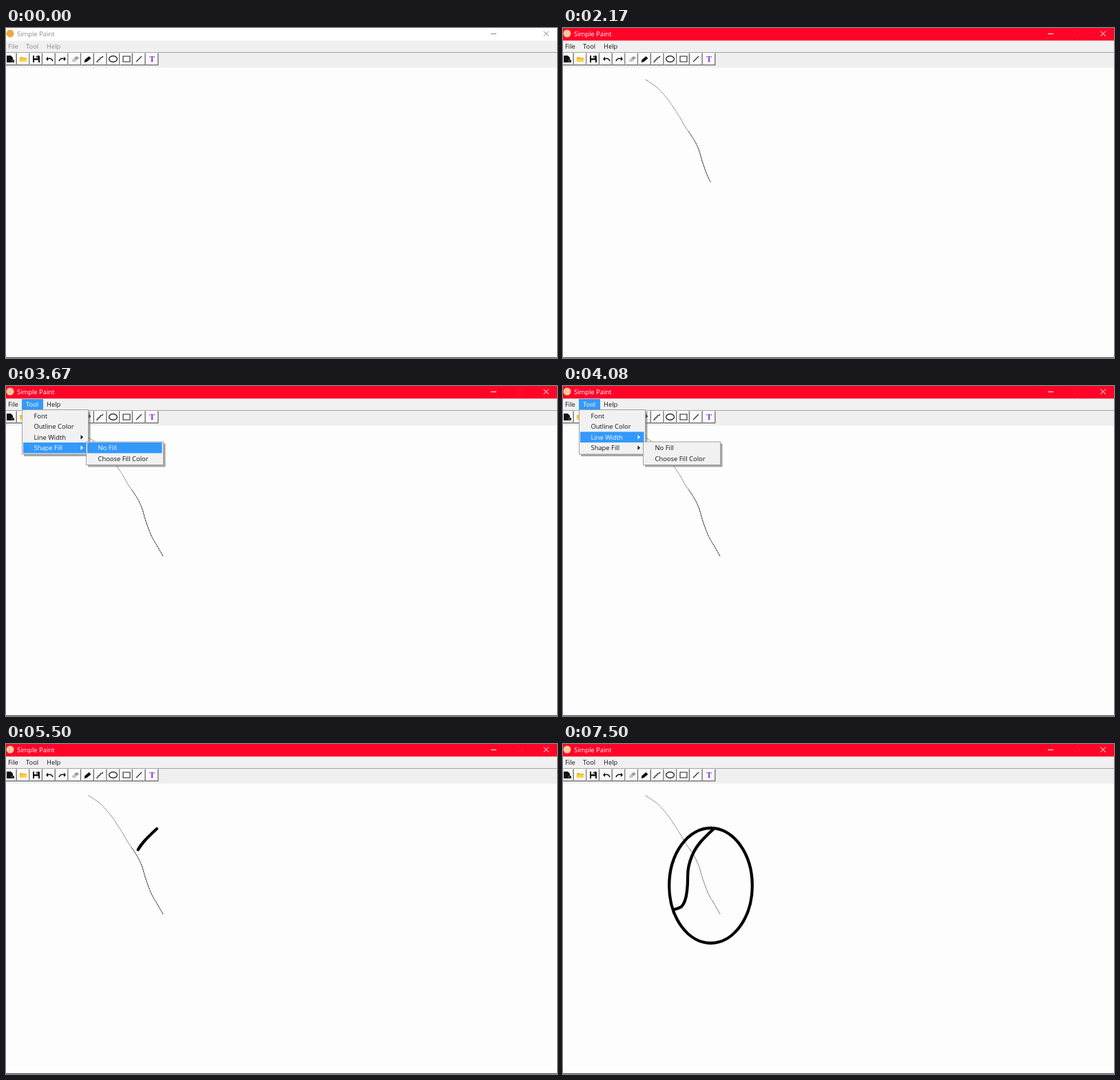
Recreate the animation shown at these times as an HTML page. Size 800 by 479 pixels, loop 8 s.

```html
<!DOCTYPE html>
<html lang="en">
<head>
<meta charset="utf-8">
<title>Simple Paint</title>
<style>
  html, body { margin: 0; width: 100%; height: 100%; overflow: hidden; background: #fefdfe; }
  svg { display: block; width: 100vw; height: 100vh; }
  text { font: 9.4px "Open Sans", "Noto Sans", sans-serif; }
  .ink { fill: none; stroke: #000; stroke-linecap: round; stroke-linejoin: round; }
</style>
</head>
<body>
<svg id="stage" viewBox="0 0 800 479" preserveAspectRatio="none"></svg>
<script>
const LOOP = 8000, TICK = 1000 / 12;
const BLUE = '#3399fc';
const stage = document.getElementById('stage');

const rect = (x, y, w, h, fill, extra = '') =>
  `<rect x="${x}" y="${y}" width="${w}" height="${h}" fill="${fill}" ${extra}/>`;
const path = (d, stroke, width = 1, extra = '') =>
  `<path d="${d}" fill="none" stroke="${stroke}" stroke-width="${width}" ${extra}/>`;
const label = (x, y, s, fill = '#111') => `<text x="${x}" y="${y}" fill="${fill}">${s}</text>`;

// Linear interpolation through [tick, value] pairs.
function at(k, table) {
  if (k <= table[0][0]) return table[0][1];
  for (let i = 1; i < table.length; i++) {
    const [a, u] = table[i - 1], [b, v] = table[i];
    if (k <= b) return u + (v - u) * (k - a) / (b - a);
  }
  return table[table.length - 1][1];
}

// Smooth curve through points, using midpoints as joints.
function curve(points) {
  let d = `M${points[0]}`;
  for (let i = 1; i < points.length - 1; i++) {
    const [x, y] = points[i], [u, v] = points[i + 1];
    const last = i === points.length - 2;
    d += `Q${x} ${y} ${last ? u : (x + u) / 2} ${last ? v : (y + v) / 2}`;
  }
  return d;
}

const THIN = curve([[120, 75], [128, 80], [138, 87], [146, 96], [155, 107], [162, 118], [170, 130],
  [177, 143], [185, 154], [192, 165], [198, 178], [201, 190], [206, 205], [212, 220], [219, 231], [228, 247]]);
const THICK = curve([[219, 123], [205, 136], [194, 149], [187, 162], [182, 178], [181, 190],
  [181, 205], [179, 222], [175, 233], [170, 238], [162, 240]]);

const THIN_REACH = [[15, 75], [25, 211], [28, 249]];
const THICK_REACH = [[62, 0], [66, 0.295], [72, 0.81], [76, 1]];
const OVAL_REACH = [[85, 0.04], [86, 0.25], [88, 0.75], [89, 0.92], [90, 1]];

// Icons are centred on 0,0.
const ICONS = [
  '<path d="M-5-5H1L4-2V5H-5Z"/><path d="M1 1H6V5H1Z" fill="#333"/>',
  '<path d="M-5-3H-1L0-2H5V4H-5Z" fill="#f3bd2a"/><path d="M-5 4L-3 0H5V4Z" fill="#ffd24d"/>',
  '<path d="M-5-5H4L5-4V5H-5Z"/><path d="M-3-5H2V-1H-3ZM-3 1.5H3V5H-3Z" fill="#fff"/><path d="M0-4.5H1.5V-2H0Z"/>',
  '<path d="M-5 0L-2-3.5V3Z"/><path d="M-3 0Q3-2.5 5 3" fill="none" stroke="#111" stroke-width="1.6"/>',
  '<path d="M5 0L2-3.5V3Z"/><path d="M3 0Q-3-2.5-5 3" fill="none" stroke="#111" stroke-width="1.6"/>',
  '<path d="M-5 2L1-4L5-2L-1 4H-4Z" fill="#999"/><path d="M-5 2L-2-1L2 1L-1 4H-4Z" fill="#c6c6c6"/>',
  '<path d="M-5 5L-4 1L2-4L5-1L-1 4Z"/>',
  path('M-5 4H-3L-2 1H0L1-2H3L5-4', '#111', 1.2),
  '<ellipse rx="6" ry="4.3" fill="none" stroke="#111" stroke-width="1.2"/>',
  path('M-5-4H5V4H-5Z', '#222', 1.1),
  path('M-4 4L4-4', '#222', 1.1),
  '<text y="4" text-anchor="middle" fill="#8a2bd6" style="font:bold 11.5px \'Liberation Serif\',serif">T</text>'
];
const ICON_X = [6, 25, 44, 63, 82, 101, 118.5, 136, 155.5, 175, 193, 212];

function button(i, down) {
  const right = 15.5 + 18.7 * i, left = right - 18.2;
  const [lit, shade] = down ? ['#555', '#fff'] : ['#fff', '#666'];
  const shift = down ? 1 : 0;
  return rect(left, 36.5, 18.2, 17.5, down ? '#f2f2f2' : '#fafafa') +
    path(`M${left + .5} 54V37H${right}`, lit) +
    path(`M${left} 53.6H${right - .4}V36.5`, shade, 1.3) +
    `<g transform="translate(${ICON_X[i] + shift} ${45 + shift})" fill="#111">${ICONS[i]}</g>`;
}

function titleBar(active) {
  const mark = active ? '#fff' : '#888';
  return rect(0, 0, 800, 18.5, active ? '#ff0429' : '#fff') +
    `<circle cx="6" cy="8" r="5.5" fill="${active ? '#f8c99a' : '#e8a93c'}"/>` +
    label(16, 11.7, 'Simple Paint', active ? '#fff' : '#888') +
    path('M704 8.5H712', mark) +
    (active ? path('M742.5 4.5H749.5V11.5H742.5Z', '#e91d38', 1, 'stroke-dasharray="2 1"') : '') +
    path('M780.5 4.5L788 12M788 4.5L780.5 12', mark);
}

function toolBar(k) {
  const pressed = k === 13 ? 6 : k === 82 || k === 83 ? 8 : -1;
  return rect(0, 35, 800, 22.5, '#efefef') + rect(0, 35, 800, 1, '#a3a3a3') +
    ICONS.map((_, i) => button(i, i === pressed)).join('');
}

function menuBar(k) {
  const ink = k < 13 ? '#888' : '#111', open = k >= 37 && k < 58;
  return rect(0, 18.5, 800, 16.5, '#f0f0f0') +
    (open ? rect(23, 19, 31, 15, BLUE) : k >= 35 && k < 37 ? rect(23, 19, 31, 15, '#91c9f7') : '') +
    label(3, 29.5, 'File', ink) + label(29, 29.5, 'Tool', open ? '#fff' : ink) + label(59, 29.5, 'Help', ink);
}

function popup(x, y, w, items, hot, textX, arrowsFrom = 99) {
  const h = items.length * 15.5 + 3.5;
  let out = rect(x + 3, y + 3, w - .5, h - .5, '#777', 'opacity=".65"') +
    rect(x + .5, y + .5, w - 1, h - 1, '#f1f1f1', 'stroke="#a0a0a0"');
  items.forEach((s, i) => {
    const top = y + 1.5 + i * 15.5, ink = i === hot ? '#fff' : '#111';
    if (i === hot) out += rect(x + 2, top, w - 4.5, 15.5, BLUE);
    out += label(textX, top + 11.3, s, ink);
    if (i >= arrowsFrom) out += `<path d="M108.5 ${top + 4.5}L112 ${top + 7.7}L108.5 ${top + 11}Z" fill="${ink}"/>`;
  });
  return out;
}

// [tick, highlighted row, open submenu, highlighted submenu item]
const MENU_STEPS = [
  [37, -1], [38, 0], [39, 2], [40, 2, 'width', -1],
  [44, 3, 'fill', 0], [45, 3, 'fill', 1], [48, 3, 'fill', 0], [49, 2, 'fill', -1],
  [50, 2, 'width', -1], [53, 2, 'width', 1], [55, 2, 'width', 2]
];

function menu(k) {
  if (k < 37 || k >= 58) return '';
  const [, row, sub, item] = MENU_STEPS.filter(s => s[0] <= k).pop();
  let out = popup(23, 34, 97, ['Font', 'Outline Color', 'Line Width', 'Shape Fill'], row, 40.5, 2);
  if (sub === 'width') out += popup(116, 65.5, 55, ['2px', '4px', '6px', '8px'], item, 133.5);
  if (sub === 'fill') out += popup(116, 80.5, 113, ['No Fill', 'Choose Fill Color'], item, 133.5);
  return out;
}

function drawing(k) {
  let out = '';
  if (k >= 16) {
    const end = at(k, THIN_REACH), faint = k >= 86;
    const part = (id, from, to, dash) =>
      `<clipPath id="${id}"><rect x="100" y="${from}" width="150" height="${Math.max(0, to - from)}"/></clipPath>` +
      path(THIN, '#111', 1, `clip-path="url(#${id})" stroke-dasharray="${dash}"`);
    out += part('upper', 70, Math.min(end, 150), '1.3 1.4') +
      part('lower', 150, end, faint ? '1.5 1.2' : '3 .7');
  }
  if (k >= 63) {
    const shown = at(k, THICK_REACH);
    out += `<path class="ink" d="${THICK}" stroke-width="4.3" pathLength="1" stroke-dasharray="${shown} 2"/>`;
  }
  if (k >= 86) {
    const f = at(k, OVAL_REACH), rx = 60.3 * f, ry = 83.5 * f;
    out += `<ellipse class="ink" cx="${154.2 + rx}" cy="${122 + ry}" rx="${rx}" ry="${ry}" stroke-width="4.3"/>`;
  }
  return out;
}

function render(k) {
  stage.innerHTML = rect(0, 0, 800, 479, '#fefdfe') + drawing(k) +
    titleBar(k >= 13) + menuBar(k) + toolBar(k) + menu(k) + rect(0, 478, 800, 1, '#444');
}

const start = performance.now();
let shownTick = -1;
function frame() {
  const t = (performance.now() - start) % LOOP;
  const k = Math.floor((t + 4) / TICK) % 96;
  if (k !== shownTick) render(shownTick = k);
  requestAnimationFrame(frame);
}
frame();
</script>
</body>
</html>
```
